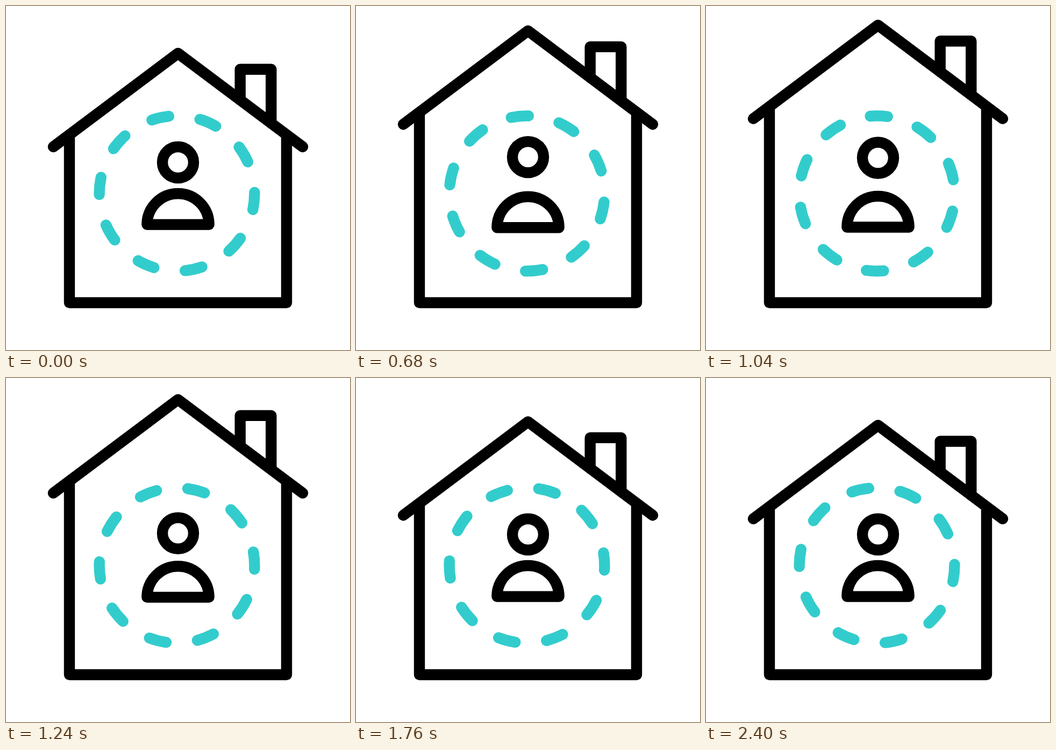
These frames come from a looping animation (640 by 640 pixels, 2.44 s). An HTML page:

```html
<!DOCTYPE html>
<html lang="en">
<head>
<meta charset="utf-8">
<title>Home</title>
<style>
  html, body { margin: 0; width: 100%; height: 100%; overflow: hidden; background: #fff; }
  svg { display: block; width: 100vw; height: 100vh; }
  path, circle { fill: none; stroke: #000; stroke-width: 20.4; stroke-linecap: round; stroke-linejoin: round; }
  #ring { stroke: #33cccc; }
</style>
</head>
<body>
<svg viewBox="0 0 640 640">
  <path id="ring"/>
  <path id="walls"/>
  <g id="top">
    <path d="M435.7 174.8V117.7H493.3V218"/>
    <path d="M88 262L320 88L552 262"/>
  </g>
  <circle id="head" cx="320" cy="291" r="29"/>
  <path id="body" d="M262.4 406.6A57.6 57.6 0 0 1 377.6 406.6Z"/>
</svg>
<script>
const LOOP = 2440, STEP = 40;
const CX = 318, CY = 348.8, R = 144.4;
const DASHES = 10, DASH = 12.8, START = -12.4;
const $ = id => document.getElementById(id);

// Ease between two rests; a and b are the handle lengths at each end.
function ease(x, a, b) {
  if (x <= 0) return 0;
  if (x >= 1) return 1;
  let lo = 0, hi = 1;
  for (let i = 0; i < 30; i++) {
    const s = (lo + hi) / 2, r = 1 - s;
    const px = 3 * a * s * r * r + 3 * (1 - b) * s * s * r + s * s * s;
    if (px < x) lo = s; else hi = s;
  }
  return lo * lo * (3 - 2 * lo);
}

// Goes from 0 to 1 and back to 0.
function swing(t, from, peak, to, a = 0.5, b = a, c = a) {
  return t < peak
    ? ease((t - from) / (peak - from), a, b)
    : 1 - ease((t - peak) / (to - peak), a, c);
}

function point(deg) {
  const k = deg * Math.PI / 180;
  return (CX + R * Math.sin(k)).toFixed(2) + " " + (CY - R * Math.cos(k)).toFixed(2);
}

let arcs = "";
for (let i = 0; i < DASHES; i++) {
  const mid = START + i * 360 / DASHES;
  arcs += `M${point(mid - DASH / 2)}A${R} ${R} 0 0 1 ${point(mid + DASH / 2)}`;
}
$("ring").setAttribute("d", arcs);

const shift = (id, y) => $(id).setAttribute("transform", `translate(0 ${y.toFixed(3)})`);

function draw(t) {
  const lift = 52.5 * swing(t, 40, 1000, 2040);
  const part = swing(t, 40, 840, 1440);
  const turn = 101.5 * swing(t, 92, 1385, 2400, 0.4, 0.4, 0.58);
  const eave = (241 - lift).toFixed(3);
  shift("top", -lift);
  $("walls").setAttribute("d", `M118 ${eave}V552H522V${eave}`);
  shift("head", -10.6 * part);
  shift("body", 6.1 * part);
  $("ring").setAttribute("transform", `rotate(${turn.toFixed(3)} ${CX} ${CY})`);
}

const begin = performance.now();
function tick() {
  const t = (performance.now() - begin) % LOOP;
  draw(Math.floor(t / STEP) * STEP);
  requestAnimationFrame(tick);
}
draw(0);
requestAnimationFrame(tick);
</script>
</body>
</html>
```
